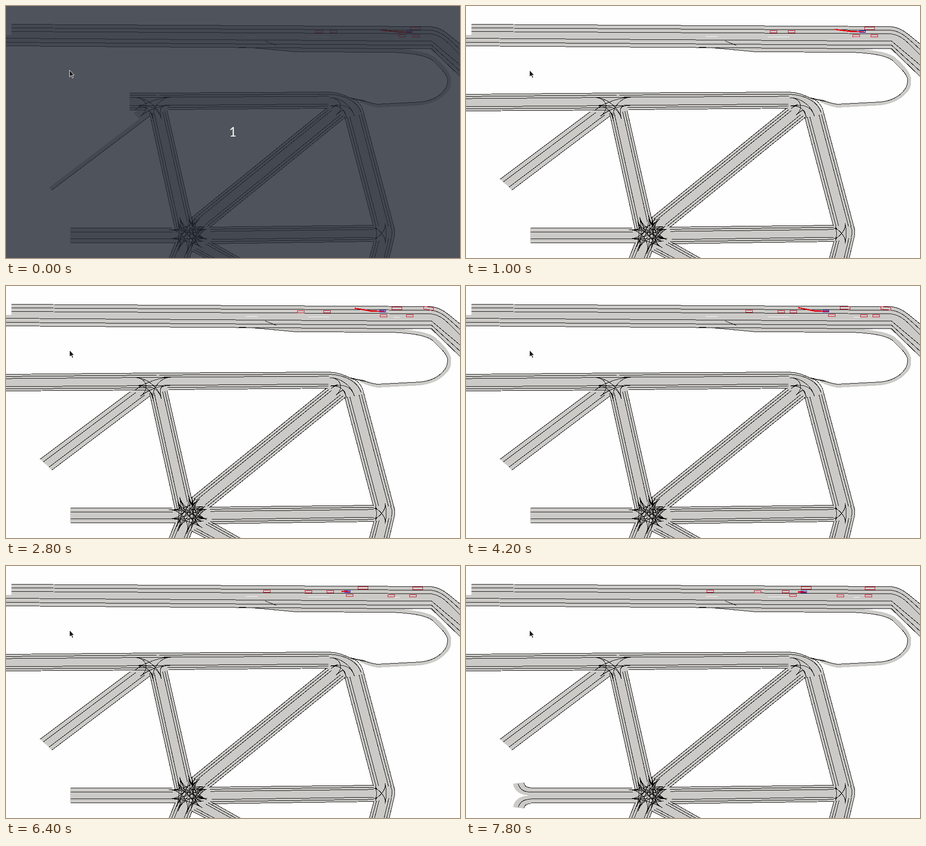
Recreate the animation shown at these times as an HTML page. Size 1004 by 558 pixels, loop 8 s.

```html
<!DOCTYPE html>
<html lang="en">
<head>
<meta charset="utf-8">
<title>Lane map</title>
<style>
  html, body { margin: 0; width: 100%; height: 100%; overflow: hidden; background: #fefefe; }
  svg { display: block; width: 1004px; height: 558px; }
  .fill { fill: #cbcac7; }
  .band { fill: none; stroke: #cbcac7; stroke-width: 8; }
  .line { fill: none; stroke: #000; }
  .dash { fill: none; stroke: #fff; }
  .car { fill: none; stroke: #d2001e; }
  .ego { fill: none; stroke: #1010e8; }
  .plan { fill: #e00010; }
  #count { font: 28px Lato, "DejaVu Sans", sans-serif; fill: #fff; text-anchor: middle; }
</style>
</head>
<body>
<svg viewBox="0 0 1004 558">
  <g id="scene" shape-rendering="crispEdges"></g>
  <g id="veil">
    <rect width="1004" height="558" fill="#242932" fill-opacity=".8"/>
    <text id="count" x="501.5" y="289">1</text>
  </g>
  <path d="M140.5 142 v15 l3.6 -3.2 2.5 5.7 2.4 -1 -2.5 -5.5 h4.3 z" fill="#1a1a1a" stroke="#fff"/>
</svg>
<script>
const LOOP = 8, STEP = .1;                       // seconds
const VEIL_UNTIL = .1, WEST_AT = .8, BEND_AT = 7.6;

const scene = document.getElementById('scene');
const veil = document.getElementById('veil');

function add(tag, attrs, parent) {
  const el = document.createElementNS('http://www.w3.org/2000/svg', tag);
  for (const k in attrs) el.setAttribute(k, attrs[k]);
  parent.appendChild(el);
  return el;
}
const group = (parent, attrs = {}) => add('g', attrs, parent);
const show = (el, on) => el.setAttribute('visibility', on ? 'visible' : 'hidden');

// Fills lie below all lane lines.
const fills = group(scene), dashes = group(scene);
const lines = group(scene, { transform: 'translate(.5 .5)' });
const layer = () => ({ fills: group(fills), lines: group(lines) });
const base = layer(), early = layer(), west = layer(), bend = layer();
const showLayer = (l, on) => { show(l.fills, on); show(l.lines, on); };

const fill = (d, l = base) => add('path', { d, class: 'fill' }, l.fills);
const line = (d, l = base) => add('path', { d, class: 'line' }, l.lines);

const SIX = [0, .13, .26, .74, .87, 1];
const FOUR = [0, .26, .74, 1];

// A straight road between edge a-b and edge c-d, with lane lines at the given fractions.
function road(a, b, c, d, lanes = SIX, l = base) {
  const mix = (p, q, f) => p.map((v, i) => v + (q[i] - v) * f);
  fill(`M${a} L${b} L${d} L${c} z`, l);
  for (const f of lanes) line(`M${mix(a, c, f)} L${mix(b, d, f)}`, l);
}

// Turning lanes: every arm, given by its angle in degrees, is joined to every other arm.
function junction(cx, cy, r, offset, angles) {
  const port = (deg, side) => {
    const a = deg * Math.PI / 180, u = Math.cos(a), v = Math.sin(a);
    return k => [cx + u * r * k - v * offset * side, cy + v * r * k + u * offset * side];
  };
  for (const from of angles) for (const to of angles) {
    if (from === to) continue;
    const p = port(from, 1), q = port(to, -1);
    line(`M${p(1)} C${p(.35)} ${q(.35)} ${q(1)}`);
  }
}

// Motorway with its bend on the right
fill('M12 40 L940 45 C962 46 974 57 1004 84 V156 L937 95 L860 96 L850 102 L640 101 L525 92 L0 88 V64 H12 z');
for (const o of [0, 8, 16, 31, 40, 48]) {
  const end = `1004 ${84 + o * 1.5}`;
  line(o < 20
    ? `M12 ${40 + o} L936 ${45 + o} C958 ${46 + o} 970 ${55 + o * 1.1} ${end}`
    : `M0 ${40 + o} L941 ${46.5 + o} L${end}`);
}
line('M573 77 L598 87 M515 91 L545 92 L597 97');

// Slip road loop
add('path', {
  class: 'band',
  d: 'M850 99 C905 100 937 108 948 118 S980.5 148 980.5 164 S977 185 966 195 S939 213 916 216 L822 221 Q803 218 785 209'
}, base.fills);
line(`M545 92 L640 101 L850 102 C905 104 935 112 945 122 S976 150 976 163 S972 183 963 192
      S938 210 915 212 L820 217 Q805 215 790 209 L762 203`);

// Town roads
road([335, 192], [714, 190], [360, 229], [712, 226]);
road([317, 237], [374, 497], [356, 232], [410, 471]);
road([708, 226], [409, 469], [751, 245], [450, 490]);
road([749, 247], [812, 487], [791, 238], [857, 487]);
road([142, 491], [367, 491], [142, 524], [374, 524], FOUR);
road([450, 489], [813, 485], [456, 526], [813, 521]);
road([452, 521], [518, 558], [410, 542], [441, 558]);
road([373, 525], [360, 558], [411, 542], [405, 558]);
road([813, 521], [803, 558], [858, 511], [847, 558]);

// Junction areas and their turning lanes
fill('M273 192 H336 L360 229 L356 236 L319 243 L300 230 H273 z');
fill('M714 190 C745 191 775 203 791 238 L749 248 L708 227 z');
fill('M366 494 L374 495 L410 469 L450 490 L456 526 L411 543 L372 525 z');
fill('M812 485 L857 487 Q861 499 858 511 L813 522 z');
line('M714 190 C738 191 752 200 768 206 L795 211 M714 195 C745 196 776 208 785 236 M762 203 C780 209 788 224 791 238');
line('M857 487 Q861 499 858 511 M850 487 Q856 499 851 512');
junction(325, 211, 42, 9, [180, -1, 77, 143]);
junction(752, 211, 36, 9, [179, 141, 75]);
junction(402, 505, 42, 10, [180, 258, 321, 359, 30, 107]);
junction(402, 505, 34, 16, [258, 321, 359, 107]);
junction(832, 503, 20, 11, [180, 256, 104]);

// West end before and after the remaining tiles arrive
road([273, 192], [335, 192], [273, 230], [310, 230], SIX, early);
fill('M95 402 L295 250 L281 237 L300 228 L320 243 L101 408 z', early);
line('M101 407 L318 243', early);
road([0, 195], [335, 192], [0, 232], [318, 230], SIX, west);
road([75, 383], [275, 233], [101, 407], [318, 243], FOUR, west);
fill('M275 233 L300 228 L320 243 L300 255 z', west);

// Forked end of the lower road, mirrored about its middle
for (const s of [-1, 1]) {
  const y = v => 508 + s * v;
  fill(`M104 ${y(26)} L128 ${y(29)} Q130 ${y(18)} 142 ${y(17)} V508 Q108 ${y(1)} 104 ${y(26)} z`, bend);
  line(`M128 ${y(28)} Q129 ${y(18)} 142 ${y(18)} M115 ${y(26)} Q120 ${y(8)} 142 ${y(8)}`, bend);
}

add('path', { d: 'M530 67.5 h27 M668 68.5 h47 M857 69.5 h14', class: 'dash' }, dashes);

// Cars wait at the head of a lane, then all pull away along the same curve.
const HEADWAY = 4.6;
const travel = s => s > 0 ? 2 * s + 1.03 * s * s : 0;
const lanes = [
  { x: 723, y: 57, w: 15, h: 5, starts: [-HEADWAY, 0, HEADWAY] },
  { x: 906, y: 66, w: 15, h: 5, starts: [-HEADWAY, 0, HEADWAY] },
  { x: 936, y: 49.5, w: 22, h: 6, starts: [-HEADWAY, HEADWAY / 2], tilt: 10 }
];
const traffic = group(scene);
const cars = lanes.flatMap(lane => lane.starts.map(start => ({
  ...lane, start,
  el: add('rect', { x: -Math.floor(lane.w / 2), y: -lane.h / 2, width: lane.w, height: lane.h, class: 'car' }, traffic)
})));
const ego = add('rect', { x: -6, y: -2, width: 13, height: 4, class: 'ego' }, traffic);
const plan = add('path', { class: 'plan' }, traffic);

const snap = v => Math.floor(v) + .5;
const clamp = v => Math.min(1, Math.max(0, v));

function drawCar(c, t) {
  const d = travel(t - c.start);
  const y = c.y - Math.round(d * .006);
  const turn = c.tilt ? Math.max(0, c.tilt - d * .7) : 0;
  c.el.setAttribute('transform', `translate(${snap(c.x - d)} ${y}) rotate(${turn})`);
  show(c.el, t >= c.start - 1);
}

// The blue car slows to a stop while its planned path shortens.
function drawEgo(t) {
  const f = clamp(t / 7.8);
  const x = 891 - 145 * Math.sin(f * Math.PI / 2) ** 1.45;
  const y = 57.5 - 2 * Math.sin(f * Math.PI);
  const short = clamp((t - 4.2) / 2.2);
  const reach = 62 - 50 * short;
  const rise = (4 + .9 * t) * (1 - short);
  const tip = x - reach, mid = x - reach * .42, end = x + 6;
  ego.setAttribute('transform', `translate(${snap(x)} ${snap(y)})`);
  plan.setAttribute('d', `M${tip} ${y - rise - 1.2} L${mid} ${y - 2} L${end} ${y}
    V${y + 1.5} L${mid} ${y + 1} L${tip} ${y - rise + 1.2} z`);
}

function tick() {
  const now = performance.now() / 1000 % LOOP;
  const t = Math.floor(now / STEP + 1e-6) * STEP;
  show(veil, now < VEIL_UNTIL);
  showLayer(early, now < WEST_AT);
  showLayer(west, now >= WEST_AT);
  showLayer(bend, now >= BEND_AT);
  cars.forEach(c => drawCar(c, t));
  drawEgo(t);
  requestAnimationFrame(tick);
}
tick();
</script>
</body>
</html>
```
